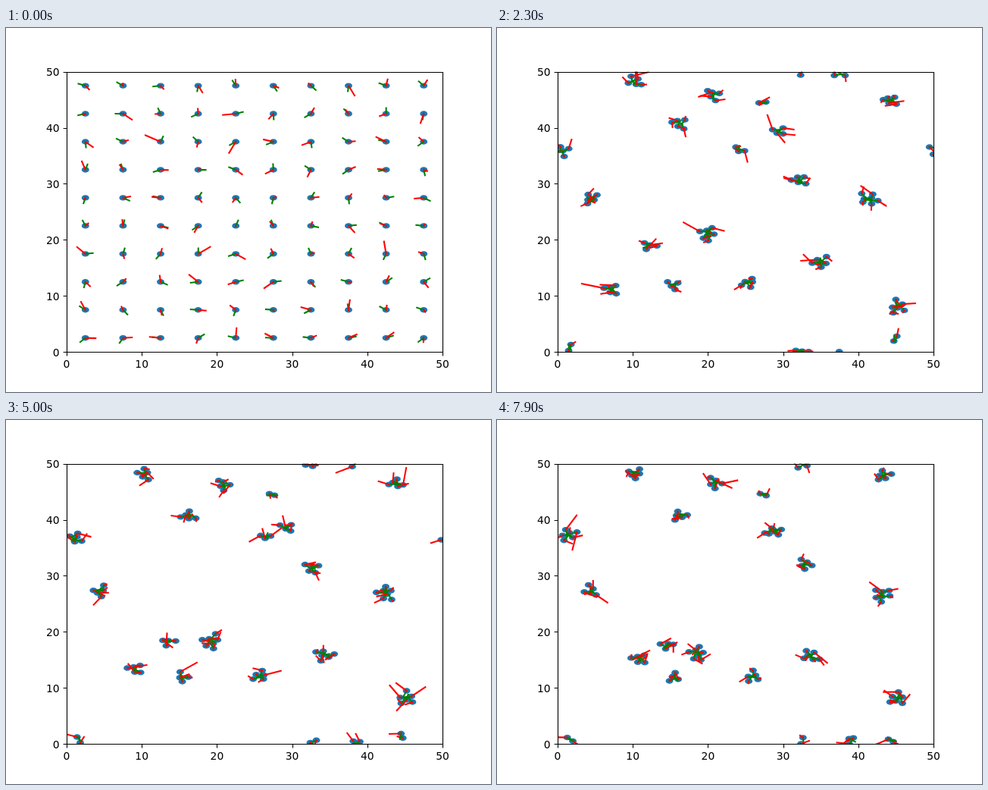
Recreate the animation shown at these times as an HTML page with a canvas. Size 640x480 px, loop 8000 ms.

```html
<!DOCTYPE html>
<html lang="en">
<head>
<meta charset="utf-8">
<title>Clustering particles</title>
<style>
  html, body { margin: 0; width: 100%; height: 100%; overflow: hidden; background: #fff; }
  canvas, svg { position: absolute; left: 0; top: 0; width: 640px; height: 480px; }
  text { font: 13.89px "DejaVu Sans", sans-serif; }
</style>
</head>
<body>
<canvas id="stage" width="640" height="480"></canvas>
<svg id="axes" viewBox="0 0 640 480"></svg>
<script>
const SIZE = 50, STEP = 100, STEPS = 80, TAU = Math.PI * 2;
const SPEED = 4.6, SETTLED = 2, END = 7.9;
const LEFT = 80, TOP = 57.6, W = 496, H = 369.6;
const px = x => LEFT + x * W / SIZE;
const py = y => TOP + H - y * H / SIZE;
const wrap = v => ((v % SIZE) + SIZE) % SIZE;
// shortest signed way across the periodic box
const gap = d => d - SIZE * Math.round(d / SIZE);

// seeded random number in 0..1
function rnd(a, b) {
  let h = Math.imul(a + 1, 374761393) ^ Math.imul(b + 7, 668265263);
  h = Math.imul(h ^ (h >>> 15), 2246822519);
  h = Math.imul(h ^ (h >>> 13), 3266489917);
  return ((h ^ (h >>> 16)) >>> 0) / 4294967296;
}

function gauss(a, b) {
  const r = Math.sqrt(-2 * Math.log(1 - rnd(a, b) * 0.999));
  const q = TAU * rnd(a, b + 5000);
  return [r * Math.cos(q), r * Math.sin(q)];
}

// meeting points: x, y and, for those that wander, the total drift
const clusters = [
  [10.3, 48.2], [20.6, 45.8, 0.3, 0.8], [27.3, 44.5], [16.2, 40.7],
  [23.7, 35.8, 4.5, 2], [29.5, 39.6, -0.4, -1.6], [0.3, 35.7, 1.2, 1.7],
  [4.4, 27.3], [32, 30.4, 1, 1.7], [41.2, 27.4, 2, -0.8],
  [20.1, 21.7, -1.5, -5.6], [11.8, 19.1, 2.8, -1.5], [6.7, 10.7, 4.1, 4.5],
  [15.4, 11.9], [25.3, 12.3, 0.7, -0.3], [35.1, 16, -1.4, -0.3],
  [45.2, 8.1], [45, 2.6, -0.7, -2], [1.6, 0.7], [32.5, 0],
  [37.4, -0.6, 1.6, 1.3], [44.4, 44.5, -1, 3.3]
].map(([x, y, dx = 0, dy = 0], id) => ({
  x, y, dx, dy, members: [],
  turn: rnd(id, 11) * TAU,
  spin: rnd(id, 12) * 0.6 - 0.3
}));

// a 10 x 10 grid of particles, each drawn to its nearest meeting point
const particles = Array.from({ length: 100 }, (_, id) => {
  const x = 2.5 + 5 * (id % 10), y = 2.5 + 5 * Math.floor(id / 10);
  const way = c => Math.hypot(gap(c.x - x), gap(c.y - y));
  const home = clusters.reduce((a, b) => way(b) < way(a) ? b : a);
  const p = { id, x, y, home, way: way(home) };
  home.members.push(p);
  return p;
});

// the first to arrive sit innermost, in a sunflower packing
for (const c of clusters) {
  c.members.sort((a, b) => a.way - b.way);
  let mx = 0, my = 0;
  c.members.forEach((p, i) => {
    const r = 0.53 * Math.sqrt(i + 0.5), q = i * 2.39996;
    p.sx = r * Math.cos(q);
    p.sy = r * Math.sin(q);
    mx += p.sx / c.members.length;
    my += p.sy / c.members.length;
  });
  for (const p of c.members) {
    p.sx -= mx;
    p.sy -= my;
  }
}

function pose(p, k) {
  const t = k * STEP / 1000, c = p.home;
  const drift = Math.max(0, (t - SETTLED) / (END - SETTLED)) ** 0.75;
  const cx = c.x + c.dx * drift, cy = c.y + c.dy * drift;
  const q = c.turn + c.spin * t, cos = Math.cos(q), sin = Math.sin(q);
  const near = Math.min(1, t * SPEED / p.way);
  const shake = k ? gauss(p.id, k + 900) : [0, 0];
  const x = wrap(p.x + gap(cx + p.sx * cos - p.sy * sin - p.x) * near + shake[0] * 0.08);
  const y = wrap(p.y + gap(cy + p.sx * sin + p.sy * cos - p.y) * near + shake[1] * 0.08);
  const angle = k
    ? Math.atan2(gap(cy - y), gap(cx - x)) + (rnd(p.id, k + 300) - 0.5) * 0.8
    : rnd(p.id, 77) * TAU;
  const push = gauss(p.id, k).map(v => v * (k ? 0.95 : 0.8));
  return { x, y, push, heading: [Math.cos(angle), Math.sin(angle)] };
}

const ctx = document.getElementById('stage').getContext('2d');

function ray(x, y, [dx, dy], color) {
  ctx.strokeStyle = color;
  ctx.beginPath();
  ctx.moveTo(px(x), py(y));
  ctx.lineTo(px(x + dx), py(y + dy));
  ctx.stroke();
}

function draw(k) {
  const all = particles.map(p => pose(p, k));
  ctx.fillStyle = '#fff';
  ctx.fillRect(0, 0, 640, 480);
  ctx.save();
  ctx.beginPath();
  ctx.rect(LEFT, TOP, W, H);
  ctx.clip();
  ctx.lineWidth = 2.08;
  ctx.lineCap = 'square';
  ctx.fillStyle = '#1f77b4';
  for (const p of all) {
    ctx.beginPath();
    ctx.ellipse(px(p.x), py(p.y), W / 100, H / 100, 0, 0, TAU);
    ctx.fill();
  }
  for (const p of all) {
    ray(p.x, p.y, p.heading, '#008000');
    ray(p.x, p.y, p.push, '#ff0000');
  }
  ctx.restore();
}

function drawAxes() {
  const snap = v => Math.floor(v + 0.5) + 0.5;
  let lines = 'M80.5 58.5H576.5V427.5H80.5Z', labels = '';
  for (let v = 0; v <= SIZE; v += 10) {
    const x = px(v), y = py(v);
    lines += `M${snap(x)} 427.5v4.9M80.5 ${snap(y)}h-4.9`;
    labels += `<text x="${x}" y="448" text-anchor="middle">${v}</text>` +
      `<text x="70.6" y="${Math.round(y + 5.3)}" text-anchor="end">${v}</text>`;
  }
  document.getElementById('axes').innerHTML =
    `<path d="${lines}" fill="none" stroke="#000" stroke-width="1.11"/>${labels}`;
}

let shown = -1;
function tick(now) {
  const k = Math.floor(now / STEP) % STEPS;
  if (k !== shown) draw(shown = k);
  requestAnimationFrame(tick);
}

drawAxes();
draw(0);
requestAnimationFrame(tick);
</script>
</body>
</html>
```
